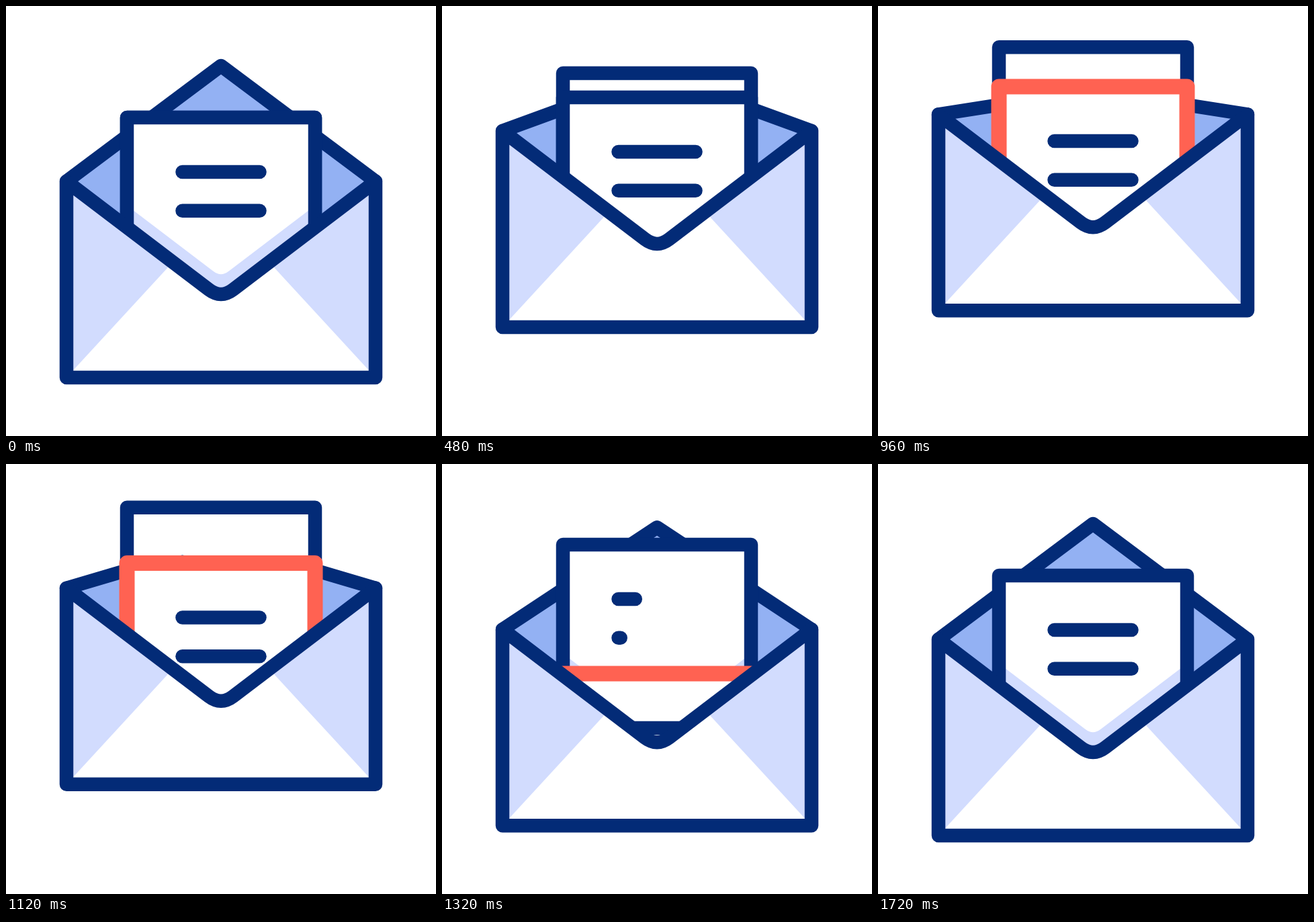
An HTML page with a canvas that plays this animation: 640 px wide and 640 px high, repeating every 2 s.

```html
<!DOCTYPE html>
<html lang="en">
<head>
<meta charset="utf-8">
<title>Envelope</title>
<style>
  html, body { margin: 0; width: 100%; height: 100%; overflow: hidden; background: #fff; }
  canvas { display: block; width: 640px; height: 640px; }
</style>
</head>
<body>
<canvas id="stage" width="640" height="640"></canvas>
<script>
const ctx = document.getElementById('stage').getContext('2d');
const LOOP = 2000, STEP = 40, LINE = 20.5;
const NAVY = '#032b77', RED = '#ff6252', SKY = '#93b1f3', PALE = '#d2dcfe', WHITE = '#fff';

// Progress 0..1 between two times, eased as cubic-bezier(a, 0, b, 1).
function ease(t, from, to, a = 1 / 3, b = 2 / 3) {
  const x = Math.min(1, Math.max(0, (t - from) / (to - from)));
  let lo = 0, hi = 1;
  for (let i = 0; i < 24; i++) {
    const u = (lo + hi) / 2, w = 1 - u;
    if (3 * a * w * w * u + 3 * b * w * u * u + u * u * u < x) lo = u;
    else hi = u;
  }
  return hi * hi * (3 - 2 * hi);
}

function pose(t) {
  const lift = ease(t, 120, 800, 0.79, 0.2);
  const settle = ease(t, 960, 1580, 0.41, 0.22);
  return {
    body: -99.7 * (ease(t, 120, 760, 0.67, 0.25) - settle),
    flap: 172 - 136 * (lift - settle),
    oldLetter: -46.3 * lift + 316 * ease(t, 940, 1640, 0.595, 0.4),
    newLetter: -104.8 * (ease(t, 120, 960, 0.69, 0.045) - ease(t, 1000, 1720, 0.606, 0.196)),
    red: 880 * ease(t, 478, 838),
    rows: [0, 65].map(delay => ease(t - delay, 1223, 1543)),
  };
}

function poly(...pts) {
  ctx.beginPath();
  pts.forEach(p => ctx.lineTo(...p));
}

function fill(color) {
  ctx.fillStyle = color;
  ctx.fill();
}

function stroke(color, width = LINE) {
  ctx.strokeStyle = color;
  ctx.lineWidth = width;
  ctx.stroke();
}

// Front edge of the pocket, left to right.
function pocket(y) {
  ctx.lineTo(90, 261 + y);
  ctx.lineTo(302, 422.1 + y);
  ctx.quadraticCurveTo(320, 435.8 + y, 338, 422.1 + y);
  ctx.lineTo(550, 261 + y);
}

function letter(y, shadeY, rows, red) {
  const top = 166 + y;
  ctx.save();
  ctx.beginPath();
  ctx.rect(180, top, 280, 400);
  fill(WHITE);
  ctx.clip();
  ctx.beginPath();
  pocket(shadeY - 19.5);
  stroke(PALE);
  ctx.restore();

  rows.forEach((p, i) => {
    if (p <= 0) return;
    const row = top + 81 + i * 57.7;
    poly([262.5, row], [262.5 + 115 * p, row]);
    stroke(NAVY);
  });

  poly([180, top + 300], [180, top], [460, top], [460, top + 300]);
  stroke(NAVY);
  if (red > 0) {
    ctx.setLineDash([red, 2000]);
    stroke(RED, 23);
    ctx.setLineDash([]);
  }
}

function draw(t) {
  const p = pose(t), y = p.body, top = 261 + y, base = 553 + y;
  const flap = [[90, top], [320, top - p.flap], [550, top]];
  ctx.clearRect(0, 0, 640, 640);
  ctx.lineCap = ctx.lineJoin = 'round';

  poly(...flap, [320, 430 + y]);
  fill(SKY);
  poly(...flap);
  stroke(NAVY);

  // Letters show only above the pocket edge.
  ctx.save();
  ctx.beginPath();
  ctx.moveTo(90, -50);
  pocket(y);
  ctx.lineTo(550, -50);
  ctx.clip();
  letter(p.newLetter, y, p.rows, 0);
  letter(p.oldLetter, p.oldLetter, [1, 1], p.red);
  ctx.restore();

  const front = () => {
    ctx.beginPath();
    pocket(y);
    ctx.lineTo(550, base);
    ctx.lineTo(90, base);
    ctx.closePath();
  };
  front();
  fill(WHITE);
  for (const side of [-1, 1]) {
    const edge = 320 + 230 * side;
    poly([edge, top], [edge, base], [320 + 75 * side, base - 168.3]);
    fill(PALE);
  }
  front();
  stroke(NAVY);
}

const start = performance.now();
function tick() {
  const t = (performance.now() - start) % LOOP;
  draw(Math.floor(t / STEP) * STEP);
  requestAnimationFrame(tick);
}
tick();
</script>
</body>
</html>
```
